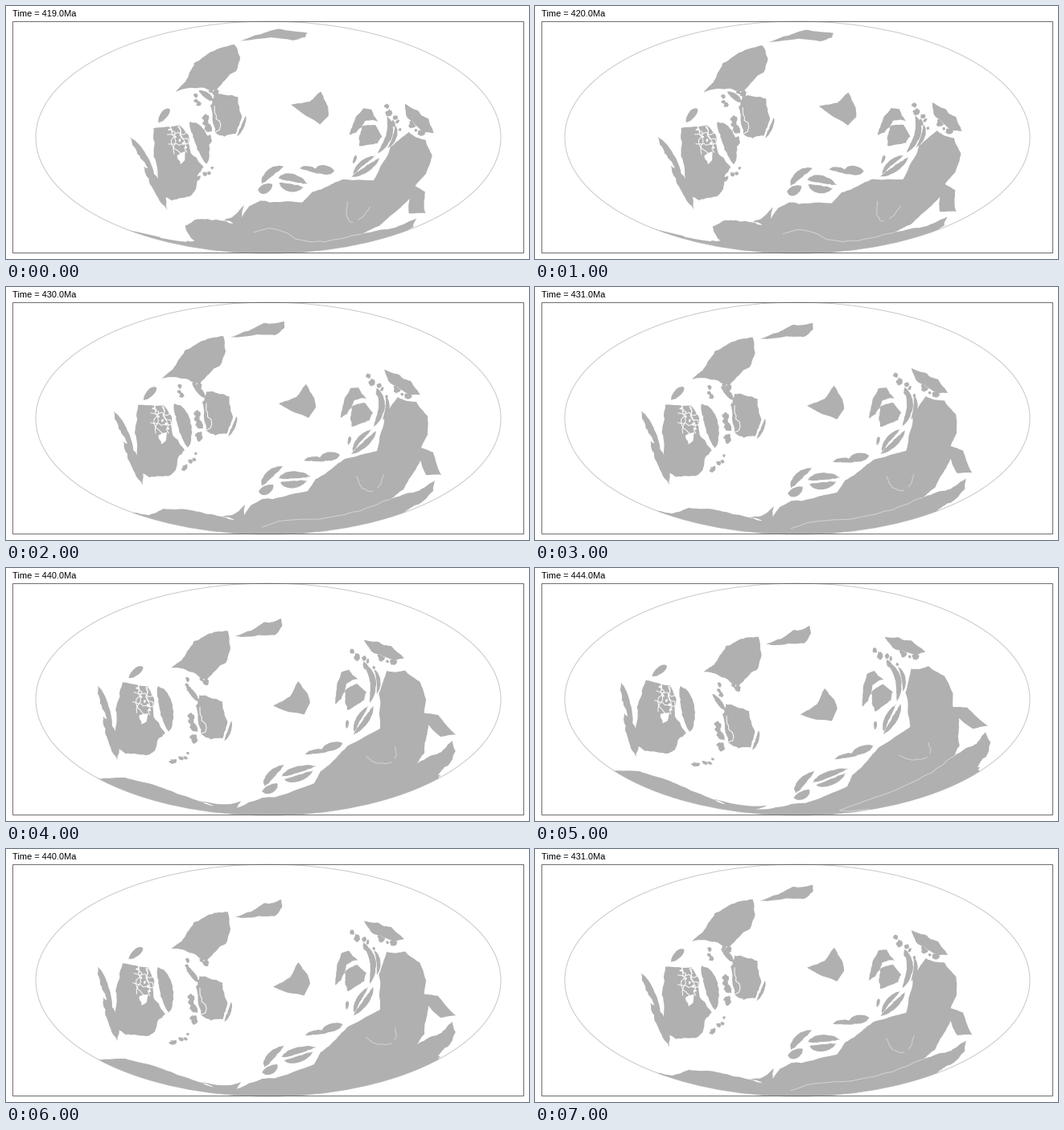
A matplotlib script that plays this animation: 650x315 px, repeating every 8 s.

```python
import numpy as np
import matplotlib.pyplot as plt
from matplotlib.animation import FuncAnimation
from matplotlib.patches import Ellipse, Polygon, Rectangle

W, H, DPI = 650, 315, 100
CX, CY, RX, RY = 326, 163.5, 289, 144.5
LAND = "#b0b0b0"
AGES = [419, 420, 430, 431, 440, 444, 440, 431]

fig = plt.figure(figsize=(W / DPI, H / DPI), dpi=DPI, facecolor="white")
ax = fig.add_axes([0, 0, 1, 1])
ax.set(xlim=(0, W), ylim=(H, 0))
ax.axis("off")
globe = ax.add_patch(Ellipse((CX, CY), 2 * RX, 2 * RY, fc="none", ec="#c8c8c8", lw=0.72))
rng = np.random.default_rng(4)
movers = []


# Mollweide projection between stage pixels and unit vectors
def to_sphere(points):
    p = np.asarray(points, float)
    th = np.arcsin(np.clip((CY - p[:, 1]) / RY, -0.999, 0.999))
    lat = np.arcsin((2 * th + np.sin(2 * th)) / np.pi)
    lon = np.pi * (p[:, 0] - CX) / (RX * np.cos(th))
    return np.column_stack([np.cos(lat) * np.cos(lon),
                            np.cos(lat) * np.sin(lon), np.sin(lat)])


def to_stage(v, cap=False):
    lat = np.arcsin(np.clip(v[:, 2], -1, 1))
    lon = np.unwrap(np.arctan2(v[:, 1], v[:, 0]))
    th = lat.copy()
    for _ in range(12):
        slope = np.maximum(2 + 2 * np.cos(2 * th), 1e-6)
        th -= (2 * th + np.sin(2 * th) - np.pi * np.sin(lat)) / slope
    if cap:  # repeat the coast round the globe and fill to the pole
        lon = np.concatenate([lon + 2 * np.pi * k for k in (-1, 0, 1)])
        th = np.tile(th, 3)
    p = np.column_stack([CX + RX * lon / np.pi * np.cos(th), CY - RY * np.sin(th)])
    return np.vstack([p, [(2000, 400), (-2000, 400)]]) if cap else p


def fit_spin(start, end):
    """Axis and angle of the rotation that best carries start onto end."""
    u, _, vt = np.linalg.svd(to_sphere(start).T @ to_sphere(end))
    d = np.sign(np.linalg.det(vt.T @ u.T))
    r = vt.T @ np.diag([1, 1, d]) @ u.T
    axis = np.array([r[2, 1] - r[1, 2], r[0, 2] - r[2, 0], r[1, 0] - r[0, 1]])
    angle = np.arccos(np.clip((np.trace(r) - 1) / 2, -1, 1))
    return axis / np.linalg.norm(axis), angle


def spin(v, axis, angle):
    along = np.outer(v @ axis, axis)
    return along + (v - along) * np.cos(angle) + np.cross(axis, v) * np.sin(angle)


# Shape makers, all in stage pixels at 430 Ma
def rough(points, amount=0.05, closed=True, levels=3):
    """Midpoint displacement for ragged coasts."""
    p = np.asarray(points, float)
    if closed:
        p = np.vstack([p, p[:1]])
    for _ in range(levels):
        step = np.diff(p, axis=0)
        side = np.column_stack([-step[:, 1], step[:, 0]])
        out = np.empty((2 * len(p) - 1, 2))
        out[::2] = p
        out[1::2] = p[:-1] + step / 2 + side * rng.normal(0, amount, (len(step), 1))
        p = out
    return p


def ribbon(start, bend, end, width):
    """Tapered sliver along a curve that passes through bend."""
    a, b, c = (np.array(q, float) for q in (start, bend, end))
    t = np.linspace(0, 1, 9)[:, None]
    ctrl = 2 * b - (a + c) / 2
    spine = (1 - t) ** 2 * a + 2 * t * (1 - t) * ctrl + t ** 2 * c
    d = np.gradient(spine, axis=0)
    side = np.column_stack([-d[:, 1], d[:, 0]]) / np.linalg.norm(d, axis=1)[:, None]
    half = side * width / 2 * np.sin(np.pi * t) ** 0.6
    return rough(np.vstack([spine + half, (spine - half)[::-1]]), 0.07, levels=1)


def blob(x, y, r):
    a = np.linspace(0, 2 * np.pi, 8)[:-1]
    s = r * rng.uniform(0.6, 1.3, (7, 1))
    return rough([x, y] + s * np.column_stack([np.cos(a), np.sin(a)]), 0.1, levels=1)


def scatter(start, end, n, r):
    """Islets strewn along a line."""
    places = np.linspace(start, end, n) + rng.normal(0, r / 2, (n, 2))
    return [blob(x, y, r * rng.uniform(0.5, 1.2)) for x, y in places]


def plate(track, lands, holes=(), cracks=(), crack_color="white", cap=False):
    """Rigid plate; track holds marks at 419, 430 and 440 Ma."""
    young, base, old = np.swapaxes(np.array(track, float), 0, 1)
    back, ahead = fit_spin(base, young), fit_spin(base, old)

    def path(points, cap=False):
        v = to_sphere(points)

        def at(age):
            axis, angle = ahead if age >= 430 else back
            part = (age - 430) / 10 if age >= 430 else (430 - age) / 11
            return to_stage(spin(v, axis, angle * part), cap)
        return at

    for shapes, fill in ((lands, LAND), (holes, "white")):
        for p in shapes:
            patch = ax.add_patch(Polygon([(0, 0), (1, 1)], fc=fill, lw=0))
            patch.set_clip_path(globe)
            movers.append((patch.set_xy, path(p, cap and fill == LAND)))
    for p in cracks:
        line, = ax.plot([], [], color=crack_color, lw=0.7)
        line.set_clip_path(globe)
        movers.append((lambda q, line=line: line.set_data(q.T), path(p)))


# northern arc
plate([[(291, 44), (279, 63), (285, 85)], [(374, 34), (346, 44), (342, 64)]],
      [rough([(279, 63), (303, 54), (320, 45), (346, 43), (346, 51), (334, 60),
              (312, 59)], 0.03)])

# northern continent
plate([[(211, 107), (194, 114), (206, 124)], [(287, 50), (272, 64), (277, 82)]],
      [rough([(194, 114), (207, 103), (222, 79), (240, 69), (270, 61), (273, 80),
              (266, 98), (241, 120), (222, 114)]),
       *scatter((215, 124), (217, 138), 4, 3),
       *scatter((234, 121), (244, 121), 3, 3)])

# block with ragged western islands
plate([[(258, 112), (249, 131), (240, 156)], [(290, 116), (279, 137), (269, 171)],
       [(281, 160), (270, 186), (267, 214)]],
      [rough([(249, 130), (262, 132), (278, 137), (279, 150), (282, 161), (274, 183),
              (260, 185), (249, 179), (246, 158)], 0.07),
       ribbon((287, 161), (283, 174), (276, 186), 4),
       ribbon((232, 121), (241, 130), (247, 138), 7),
       *scatter((239, 153), (240, 187), 7, 4)],
      cracks=[rough([(249, 145), (249, 178)], 0.15, False)])

# western continent with its arctic channels
channels = [rough([(x, 145), (x + 8, 182)], 0.18, False) for x in (178, 186, 194, 201)]
channels += [rough([(180, y), (207, y + 2)], 0.15, False) for y in (157, 169)]
plate([[(183, 150), (164, 147), (146, 142)], [(153, 164), (134, 155), (113, 147)],
       [(203, 253), (170, 247), (138, 239)], [(246, 205), (222, 203), (198, 206)]],
      [rough([(164, 147), (196, 147), (206, 162), (207, 184), (222, 203), (214, 212),
              (211, 228), (205, 234), (178, 237), (168, 231), (163, 212), (160, 182)]),
       ribbon((209, 145), (221, 168), (226, 200), 17),
       ribbon((134, 155), (146, 177), (158, 203), 8),
       ribbon((146, 192), (159, 215), (170, 247), 12),
       ribbon((171, 141), (180, 131), (187, 125), 9)],
      holes=[blob(195, 187, 7), *scatter((182, 152), (203, 176), 6, 1.6)],
      cracks=channels)

# fragments off its south-east coast
plate([[(240, 214), (221, 227), (206, 242)], [(252, 206), (236, 209), (226, 232)]],
      scatter((222, 226), (235, 210), 5, 3.5))

# lone triangle
plate([[(391, 107), (372, 121), (362, 141)], [(352, 122), (339, 145), (332, 171)],
       [(388, 147), (372, 163), (367, 184)]],
      [rough([(373, 121), (383, 138), (385, 150), (376, 163), (358, 156), (339, 145),
              (361, 137)], 0.03)])

# eastern blocks
plate([[(446, 131), (428, 126), (415, 129)], [(426, 160), (416, 163), (410, 169)],
       [(467, 160), (456, 157), (449, 156)]],
      [rough([(428, 126), (438, 125), (448, 139), (432, 142), (424, 158), (416, 163),
              (418, 152)]),
       rough([(430, 149), (446, 144), (456, 157), (452, 166), (430, 174), (428, 162)]),
       ribbon((427, 186), (427, 190), (425, 197), 4)])

# north-eastern wedge
plate([[(497, 123), (470, 103), (445, 90)], [(531, 157), (515, 134), (495, 112)]],
      [rough([(470, 103), (488, 109), (503, 117), (515, 134), (500, 133), (487, 125),
              (476, 118)]),
       *scatter((452, 111), (464, 128), 5, 4),
       *scatter((466, 122), (472, 136), 4, 3),
       *scatter((480, 125), (498, 136), 5, 3.5)])

# crescents
plate([[(463, 183), (461, 177), (458, 168)], [(430, 212), (428, 206), (430, 205)],
       [(480, 153), (467, 138), (453, 132)]],
      [ribbon((455, 177), (439, 190), (431, 205), 6),
       ribbon((460, 179), (447, 195), (429, 208), 7),
       ribbon((460, 126), (467, 148), (457, 174), 8),
       ribbon((472, 136), (474, 150), (468, 166), 5)])

# southern archipelago
plate([[(365, 201), (371, 215), (372, 231)], [(408, 206), (414, 210), (418, 219)]],
      [ribbon((370, 216), (384, 214), (397, 217), 6),
       ribbon((390, 212), (402, 211), (415, 209), 11)])

plate([[(345, 198), (344, 223), (346, 245)], [(314, 233), (316, 258), (320, 281)],
       [(375, 222), (378, 236), (385, 246)]],
      [ribbon((318, 248), (327, 234), (344, 223), 9),
       ribbon((314, 255), (323, 253), (332, 246), 11),
       ribbon((339, 238), (356, 234), (379, 236), 9),
       ribbon((341, 243), (356, 246), (374, 241), 9)])

# great southern continent, its coast followed from dateline to dateline
plate([[(292, 249), (297, 271), (288, 290)], [(528, 203), (524, 184), (518, 166)],
       [(500, 268), (533, 241), (553, 214)], [(526, 181), (517, 153), (512, 134)]],
      [rough([(157.7, 281), (178, 284), (196, 276), (225, 277), (256, 283), (284, 290),
              (268, 285), (281, 284), (297, 271), (296, 284), (304, 272), (318, 264),
              (345, 261), (375, 254), (385, 239), (404, 227), (421, 214), (449, 207),
              (461, 204), (468, 176), (470, 160), (487, 137), (510, 143), (524, 161),
              (524, 184), (516, 200), (531, 206), (541, 234), (522, 234), (515, 216),
              (506, 232), (494, 252), (478, 264), (506, 256), (533, 241), (531, 254),
              (512, 271), (494.3, 281)], 0.035, False)],
      cracks=[rough([(318, 299), (400, 287), (478, 264)], 0.03, False),
              rough([(436, 236), (442, 250), (456, 254)], 0.1, False),
              rough([(462, 250), (469, 234)], 0.1, False)],
      crack_color="#d4d4d4", cap=True)

ax.add_patch(Rectangle((8.5, 19.5), 635, 288, fc="none", ec="#6e6e6e", lw=0.72,
                       snap=False))
label = ax.text(8, 13, "", fontsize=11 * 72 / DPI, family="Liberation Sans",
                color="black", va="baseline")


def draw(i):
    age = AGES[i]
    label.set_text(f"Time = {age:.1f}Ma")
    for place, path in movers:
        place(path(age))
    return []


anim = FuncAnimation(fig, draw, frames=len(AGES), interval=1000, repeat=True,
                     repeat_delay=0, blit=False)
plt.show()
```
